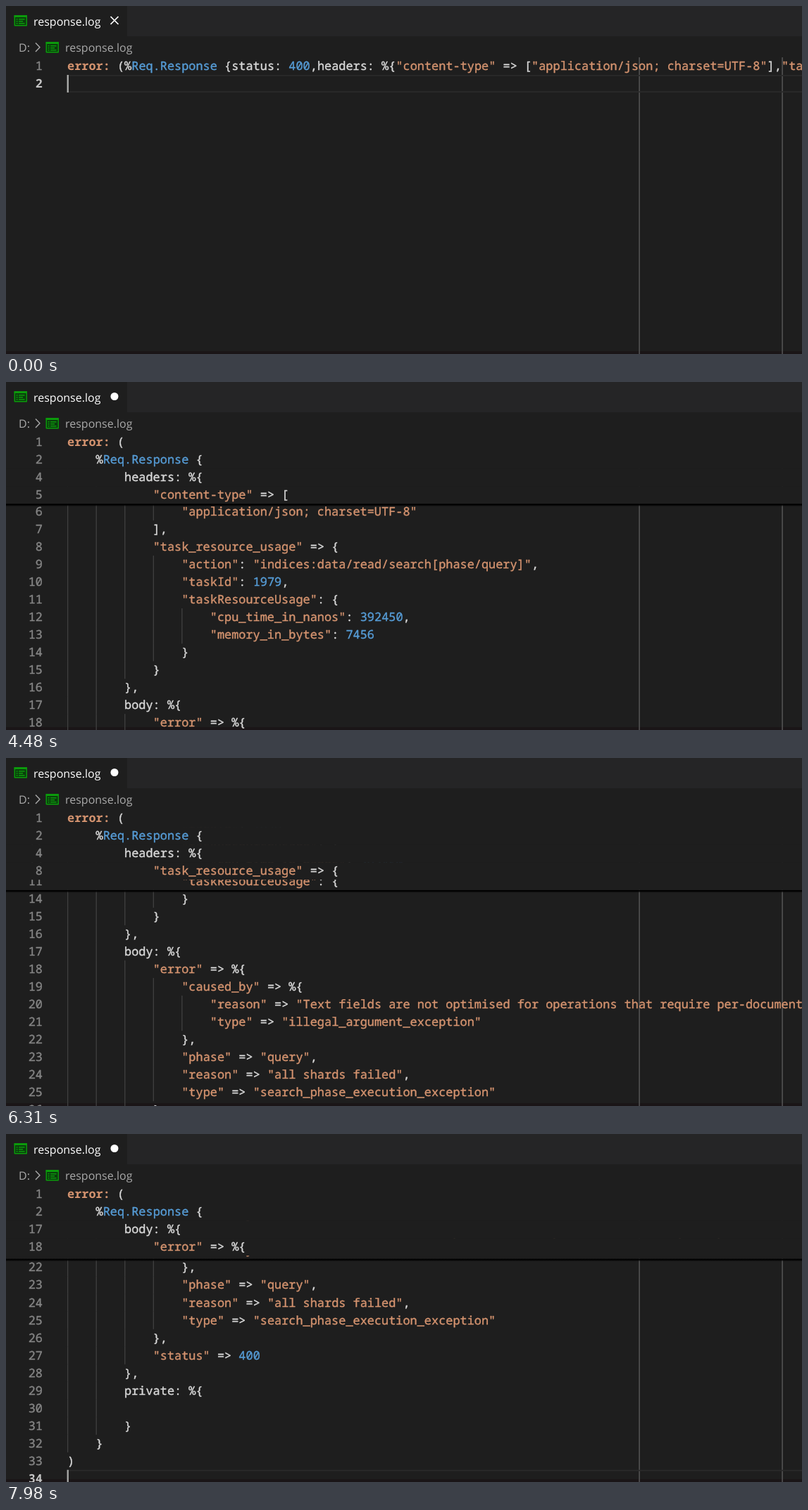
Recreate the animation shown at these times as an HTML page with a canvas. Size 1130 px wide and 495 px high, loop 8 s.

```html
<!DOCTYPE html>
<html lang="en">
<head>
<meta charset="utf-8">
<title>response.log</title>
<style>
  html, body { margin: 0; height: 100%; overflow: hidden; background: #1e1e1e; }
  canvas { display: block; }
</style>
</head>
<body>
<canvas id="stage" width="1130" height="495"></canvas>
<script>
const W = 1130, H = 495, LOOP = 8000;
const TOP = 73, LEFT = 87, ROW = 25.03, CHAR = 10.14, WHEEL = 26.33;
const FORMAT_AT = 2400;
const WHEEL_TIMES = [4480, 4870, 5340, 5570, 5770, 5870, 6180, 6310,
                     6440, 6540, 6640, 6980, 7050, 7120, 7190, 7260];
const MONO = '16.9px "Noto Sans Mono", monospace';
const UI = '16px "Open Sans", sans-serif';
const BG = '#1e1e1e', PLAIN = '#d8d8d8', STRING = '#d4936f', VALUE = '#569cd6', GREEN = '#0c9a0c';

const raw = [
  'error: (%Req.Response {status: 400,headers: %{"content-type" => ["application/json; charset=UTF-8"],"task_resource_usage" => {',
  ''
];

const formatted = `error: (
    %Req.Response {
        status: 400,
        headers: %{
            "content-type" => [
                "application/json; charset=UTF-8"
            ],
            "task_resource_usage" => {
                "action": "indices:data/read/search[phase/query]",
                "taskId": 1979,
                "taskResourceUsage": {
                    "cpu_time_in_nanos": 392450,
                    "memory_in_bytes": 7456
                }
            }
        },
        body: %{
            "error" => %{
                "caused_by" => %{
                    "reason" => "Text fields are not optimised for operations that require per-document field data",
                    "type" => "illegal_argument_exception"
                },
                "phase" => "query",
                "reason" => "all shards failed",
                "type" => "search_phase_execution_exception"
            },
            "status" => 400
        },
        private: %{

        }
    }
)
`.split('\n');

const ctx = document.getElementById('stage').getContext('2d');
ctx.textRendering = 'geometricPrecision';
ctx.lineJoin = 'round';

function rect(x, y, w, h, color) {
  ctx.fillStyle = color;
  ctx.fillRect(x, y, w, h);
}

function text(str, x, y, color, font) {
  ctx.font = font;
  ctx.fillStyle = color;
  ctx.fillText(str, x, y);
}

// Code text is set slightly heavier than the regular weight.
function code(str, x, y, color, bold) {
  text(str, x, y, color, bold ? 'bold ' + MONO : MONO);
  if (bold) return;
  ctx.strokeStyle = color;
  ctx.lineWidth = 0.4;
  ctx.strokeText(str, x, y);
}

function stroke(points, color, width) {
  ctx.strokeStyle = color;
  ctx.lineWidth = width;
  ctx.beginPath();
  points.forEach(([x, y], i) => i ? ctx.lineTo(x, y) : ctx.moveTo(x, y));
  ctx.stroke();
}

// Indent depth; blank lines inside a block take the depth of the next line.
function depth(lines, i) {
  if (lines[i]) return lines[i].search(/\S/) / 4;
  return i + 1 < lines.length ? depth(lines, i + 1) : 0;
}

// Foldable blocks: a line followed by deeper ones, without the closing line.
const scopes = [];
formatted.forEach((line, start) => {
  const level = depth(formatted, start);
  let end = start;
  while (end + 1 < formatted.length && depth(formatted, end + 1) > level) end++;
  if (end > start) scopes.push({ start, end, level });
});

function drawLine(lines, i, y, active) {
  const base = y + 18.1;
  ctx.textAlign = 'right';
  code(i + 1, 52, base, active ? '#c6c6c6' : '#858585', active);
  ctx.textAlign = 'left';
  let col = 0;
  lines[i].split(/("[^"]*"?|error:|Req\.Response|\d+)/).forEach((token, k) => {
    const isKey = token === 'error:';
    const color = k % 2 === 0 ? PLAIN : isKey || token[0] === '"' ? STRING : VALUE;
    if (token.trim()) code(token, LEFT + col * CHAR, base, color, isKey);
    col += token.length;
  });
}

function drawLines(lines, scroll, cursor) {
  rect(898.4, TOP, 1.4, H, '#5a5a5a');
  rect(1101.4, TOP, 1.4, H, '#5a5a5a');
  const last = lines.length - 1;
  lines.forEach((line, i) => {
    const y = TOP + i * ROW - scroll;
    if (y < TOP - ROW || y > H) return;
    for (let g = 0; g < depth(lines, i); g++)
      rect(LEFT + g * 4 * CHAR, y, 1.3, ROW + 0.1, '#404040');
    if (i === last) {
      rect(LEFT, y, W, 1.8, '#2a2a2a');
      rect(LEFT, y + ROW - 1.8, W, 1.8, '#2a2a2a');
    }
    drawLine(lines, i, y, i === last);
    if (i === last) {
      ctx.globalAlpha = cursor;
      rect(86.6, y, 2.3, ROW, '#aeafad');
      ctx.globalAlpha = 1;
    }
  });
}

// Pinned block headers; the deepest one is pushed up by the end of its block.
function drawSticky(lines, scroll) {
  const pinned = [];
  let shift = 0;
  for (const { start, end, level } of scopes) {
    const slot = level * ROW;
    const bottom = (end + 1) * ROW - scroll;
    if (slot > start * ROW - scroll && slot <= bottom) {
      pinned.push(start);
      shift = Math.min(0, bottom - slot - ROW);
    }
  }
  if (!pinned.length) return;

  const edge = TOP + pinned.length * ROW + shift;
  const shade = ctx.createLinearGradient(0, edge, 0, edge + 4);
  shade.addColorStop(0, '#000');
  shade.addColorStop(0.35, '#000');
  shade.addColorStop(1, '#0000');
  rect(0, edge, W, 4, shade);
  for (let k = pinned.length - 1; k >= 0; k--) {
    const y = TOP + k * ROW + (k === pinned.length - 1 ? shift : 0);
    rect(0, y, W, ROW, BG);
    drawLine(lines, pinned[k], y, false);
  }
}

function logIcon(x, y) {
  rect(x, y, 18.4, 15.4, '#0a3d0c');
  ctx.strokeStyle = GREEN;
  ctx.lineWidth = 1.4;
  ctx.strokeRect(x + 0.7, y + 0.7, 17, 14);
  rect(x, y, 18, 3, GREEN);
  for (let r = 0; r < 3; r++) {
    rect(x + 3, y + 5 + r * 3, 2, 1.5, GREEN);
    rect(x + 6.5, y + 5 + r * 3, r === 1 ? 6 : 8.5, 1.5, GREEN);
  }
}

function drawHeader(dirty) {
  rect(0, 0, W, TOP, BG);
  rect(172, 0, W, 43, '#252526');
  logIcon(11.6, 13);
  text('response.log', 39, 27.5, '#fff', UI);
  if (dirty) {
    ctx.fillStyle = '#fff';
    ctx.beginPath();
    ctx.arc(154, 20.5, 5.5, 0, 7);
    ctx.fill();
  } else {
    stroke([[148.5, 15], [159.5, 26]], '#fff', 1.7);
    stroke([[159.5, 15], [148.5, 26]], '#fff', 1.7);
  }
  text('D:', 18, 64.5, '#a9a9a9', UI);
  stroke([[42, 52.5], [48, 58.7], [42, 65]], '#a9a9a9', 1.4);
  logIcon(56.6, 51);
  text('response.log', 84, 64.5, '#a9a9a9', UI);
}

const ease = x => x * x * (3 - 2 * x);

// Smooth blink: 200 ms out, 400 ms off, 200 ms in, 200 ms on.
function blink(t) {
  const p = (t % 1000 + 1000) % 1000;
  if (p < 200) return 1 - ease(p / 200);
  if (p < 600) return 0;
  return p < 800 ? ease((p - 600) / 200) : 1;
}

function draw(t) {
  const done = t >= FORMAT_AT;
  rect(0, 0, W, H, BG);
  rect(0, 491, W, 4, '#1a1517');
  if (done) {
    const scroll = WHEEL * WHEEL_TIMES.filter(at => t >= at).length;
    drawLines(formatted, scroll, blink(t - 7960));
    drawSticky(formatted, scroll);
  } else {
    drawLines(raw, 0, t < 340 ? 1 : t < 1140 ? blink(t - 340) : 0);
  }
  drawHeader(done);
}

function frame() {
  draw(performance.now() % LOOP);
  requestAnimationFrame(frame);
}
frame();
</script>
</body>
</html>
```
